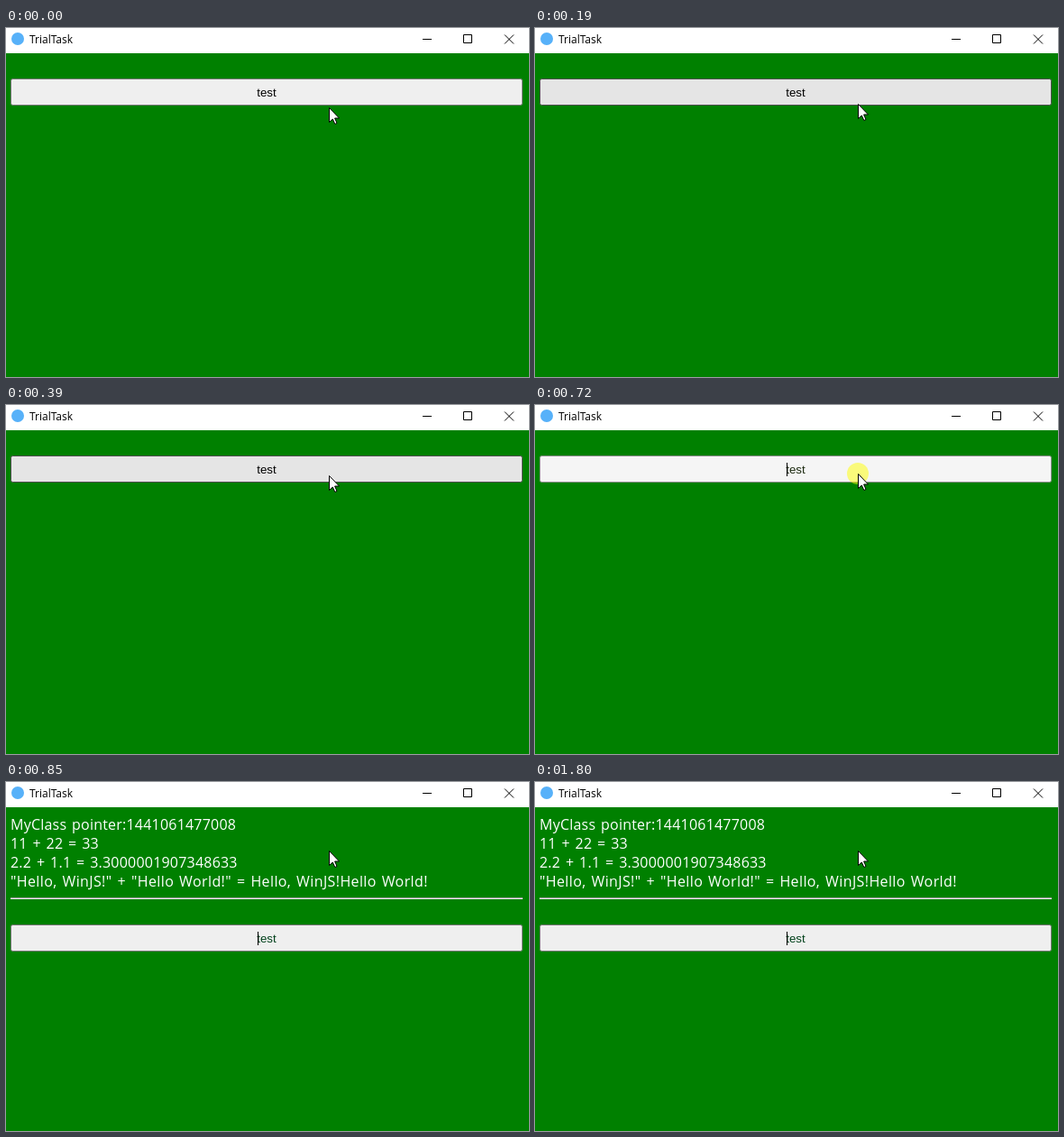
Recreate the animation shown at these times as an HTML page. Size 580x387 px, loop 1.92 s.

```html
<!DOCTYPE html>
<html lang="en">
<head>
<meta charset="utf-8">
<style>
  html, body { margin: 0; width: 100%; height: 100%; overflow: hidden; background: #008000; }
  svg { display: block; width: 580px; height: 387px; }
  text { white-space: pre; }
  .title { font: 12px "Open Sans", "Noto Sans", sans-serif; }
  .output { font: 16px "Open Sans", "Noto Sans", sans-serif; fill: #fff; letter-spacing: .21px; word-spacing: 1.4px; }
  .wide { letter-spacing: .38px; }
  .label { font: 13.333px "Liberation Sans", Arial, sans-serif; text-anchor: middle; }
</style>
</head>
<body>
<svg viewBox="0 0 580 387">
  <rect width="580" height="387" fill="#008000"/>
  <rect width="580" height="28" fill="#fff"/>
  <circle cx="13" cy="12" r="7" fill="#57b1f9"/>
  <text class="title" x="26" y="17">TrialTask</text>
  <g fill="none" stroke="#000">
    <path d="M462 12.5h10M507.5 7.5h9v9h-9z"/>
    <path d="M553 7.5l10 10m0-10l-10 10"/>
  </g>

  <g id="output">
    <g class="output">
      <text x="5" y="53">MyClass pointer:1441061477008</text>
      <text x="5" y="74">11 + 22 = 33</text>
      <text x="5" y="95">2.2 + 1.1 = 3.3000001907348633</text>
      <text class="wide" x="5" y="116">"Hello, WinJS!" + "Hello World!" = Hello, WinJS!Hello World!</text>
    </g>
    <rect x="5" y="128" width="568" height="1" fill="#9a9a9a"/>
    <rect x="5" y="129" width="568" height="1" fill="#eee"/>
  </g>

  <g id="button">
    <rect id="face" x="5.5" y="56.5" width="567" height="29" rx="2"/>
    <text id="label" class="label" x="289" y="76">test</text>
    <rect id="caret" x="279" y="64" width="1" height="15"/>
  </g>

  <circle id="press" cx="358" cy="76" r="12" fill="#ff0" opacity=".5"/>
  <path id="pointer" d="M.5 .5V16.5L4.3 13 6.8 18.5 9 17.5 6.6 12H11.5Z" fill="#fff" stroke="#000"/>
</svg>
<script>
const LOOP = 1920, HOVER = 130, PRESS = 720, RELEASE = 850;
const pointerSteps = [[0, 88], [60, 87], [130, 85], [190, 84], [320, 81], [390, 78], [520, 76]];
const looks = {
  idle: ["#efefef", "#767676", "#000"],
  hover: ["#e5e5e5", "#4f4f4f", "#000"],
  press: ["#f5f5f5", "#8d8d8d", "#1c2a10"],
  done: ["#efefef", "#767676", "#00401a"]
};
const el = id => document.getElementById(id);
const show = (id, visible) => el(id).setAttribute("visibility", visible ? "visible" : "hidden");

function draw(t) {
  const state = t < HOVER ? "idle" : t < PRESS ? "hover" : t < RELEASE ? "press" : "done";
  const [fill, border, ink] = looks[state];
  const done = state === "done";
  el("face").setAttribute("fill", fill);
  el("face").setAttribute("stroke", border);
  el("label").setAttribute("fill", ink);
  el("button").setAttribute("transform", `translate(0 ${done ? 102 : 0})`);
  show("output", done);
  show("press", state === "press");
  show("caret", t >= PRESS && t < 1320 || t >= 1800);
  const y = pointerSteps.filter(([start]) => start <= t).pop()[1];
  el("pointer").setAttribute("transform", `translate(358 ${y})`);
}

const begin = performance.now();
function tick() {
  draw((performance.now() - begin) % LOOP);
  requestAnimationFrame(tick);
}
tick();
</script>
</body>
</html>
```
